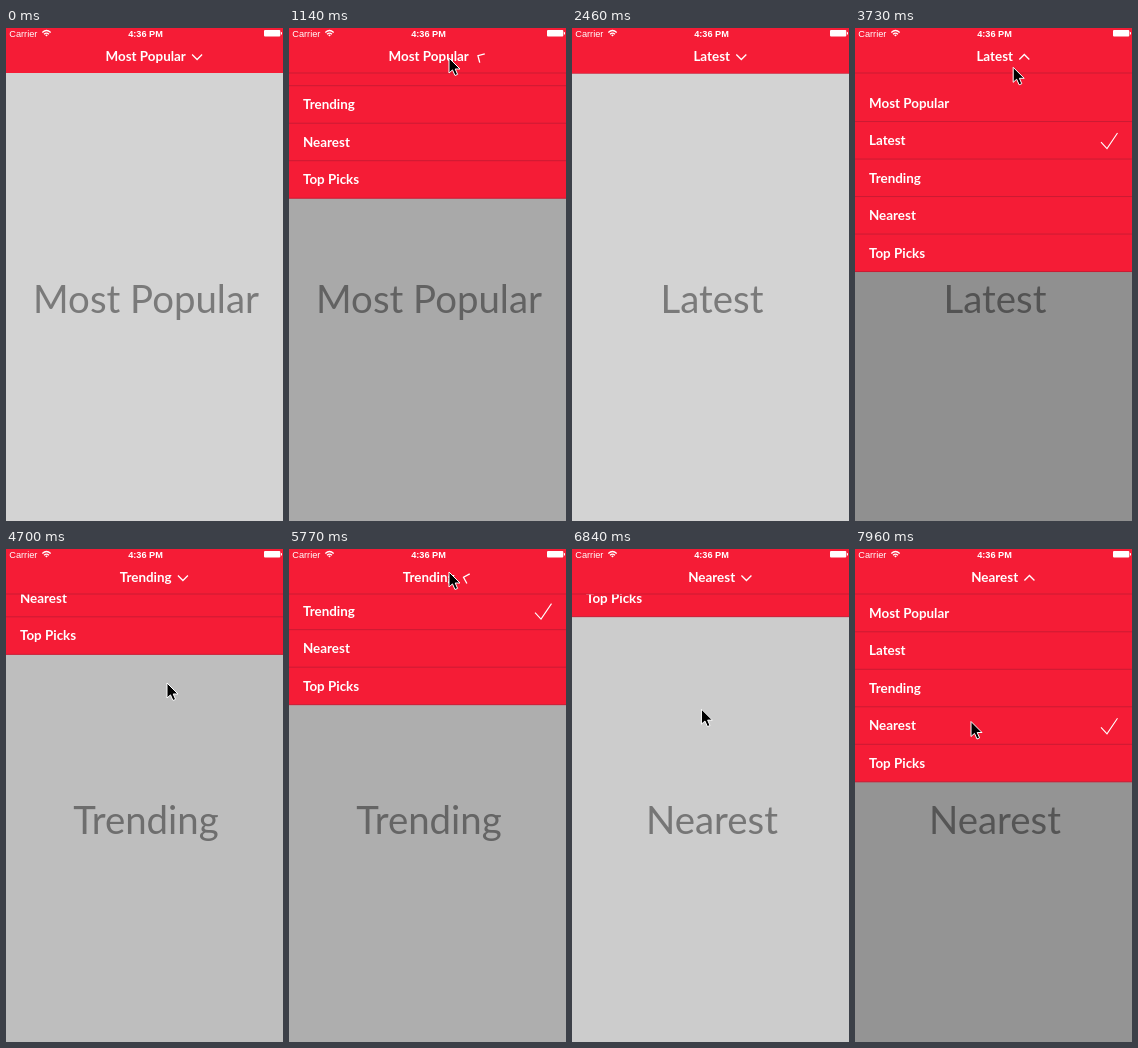
An HTML page that plays this animation: 277x493 px, repeating every 7990 ms.

```html
<!DOCTYPE html>
<html lang="en">
<head>
<meta charset="utf-8">
<title>Dropdown menu</title>
<style>
  html, body { margin: 0; width: 100%; height: 100%; overflow: hidden; background: #d3d3d3; }
  svg { display: block; width: 277px; height: 493px; }
  text { font: 700 13.4px Lato, sans-serif; fill: #fff; }
  .mid { text-anchor: middle; }
  .status { font: 9.2px "Liberation Sans", sans-serif; }
  #clock { font-weight: 700; }
  #page { font: 400 38.4px Lato, sans-serif; fill: #7a7a7a; }
  .bar { fill: #f51c36; }
  .rule { fill: #cb1a33; }
  .stroke { fill: none; stroke: #fff; }
</style>
</head>
<body>
<svg viewBox="0 0 277 493">
  <defs><clipPath id="below"><rect y="45" width="277" height="448"/></clipPath></defs>
  <rect width="277" height="493" fill="#d3d3d3"/>
  <text id="page" class="mid" x="140" y="285"></text>
  <rect id="shade" y="45" width="277" height="448"/>
  <g clip-path="url(#below)">
    <g id="menu">
      <rect class="bar" y="-200" width="277" height="387.5"/>
      <path id="check" class="stroke" stroke-width="1.1" d="M246 20.500L252 27L262.500 11.500"/>
    </g>
  </g>
  <rect class="bar" width="277" height="45"/>
  <rect id="edge" class="rule" y="44.500" width="277" height="1"/>
  <text class="status" x="3.300" y="8.500">Carrier</text>
  <g class="stroke" stroke-width="1.3">
    <path d="M36.300 4.400Q40.500 .6 44.700 4.400M38 6.200Q40.500 4 43 6.200"/>
    <path d="M39.100 7L40.500 8.600L41.900 7Q40.500 6 39.100 7Z" fill="#fff" stroke="none"/>
  </g>
  <text id="clock" class="status mid" x="139.500" y="8.500">4:36 PM</text>
  <rect x="258" y="2" width="16.300" height="6.600" rx="1" fill="#fff"/>
  <rect x="274.900" y="4" width="1.100" height="2.600" rx=".5" fill="#fff"/>
  <text id="title" class="mid" x="139.700" y="33.400"></text>
  <path id="arrow" class="stroke" stroke-width="1.3" d="M-5 -2.500L0 2.500L5 -2.500"/>
  <path id="cursor" d="M0 0V15L3.500 11.900L6 17.500L8.600 16.400L6.200 11H11Z" fill="#000" stroke="#fff" stroke-width="1" stroke-linejoin="round"/>
</svg>
<script>
const LOOP = 7990, ROW = 37.5, NAV = 45, OFFSTAGE = [279, 100];
const items = ['Most Popular', 'Latest', 'Trending', 'Nearest', 'Top Picks'];
const $ = id => document.getElementById(id);

// The menu opens with a click on the title and closes when an item is picked.
// `enter` marks visits where the pointer comes in from the side.
const visits = [
  { enter: 250, open: 1018, pick: 1970, title: [160, 30], rowX: 165 },
  { enter: 2960, open: 3475, pick: 4393, title: [158, 33], rowX: 161 },
  { open: 5661, pick: 6454, title: [160, 23], rowX: 128 },
  { open: 7470, pick: LOOP, title: [145, 25], rowX: 116 }
];

const clamp = p => Math.min(1, Math.max(0, p));
const ease = p => (1 - Math.cos(Math.PI * clamp(p))) / 2;

// Underdamped spring from 0 to 1 lasting 750 ms.
function spring(ms) {
  if (ms >= 750) return 1;
  const s = ms / 1000, decay = 9.2, freq = 10.76;
  return 1 - Math.exp(-decay * s) * (Math.cos(freq * s) + 0.81 * Math.sin(freq * s));
}

// Pointer legs: to the title before each opening, then down to the row.
const legs = [];
let place = OFFSTAGE, left = 0;
const travel = (from, until, goal) => {
  legs.push({ from, until, start: place, goal });
  place = goal;
};
visits.forEach((v, i) => {
  if (v.enter) travel(left, left + 400, OFFSTAGE);
  travel(v.enter || left + 60, v.open - 200, v.title);
  travel(v.open + 100, v.open + 490, [v.rowX, NAV + (Math.min(i + 1, 3) + 0.4) * ROW]);
  left = v.pick;
});

function pointer(t) {
  const leg = legs.filter(l => t >= l.from).pop();
  const p = ease(clamp((t - leg.from) / (leg.until - leg.from)) ** 2);
  return leg.start.map((a, i) => a + (leg.goal[i] - a) * p);
}

function addNode(tag, attrs, content = '') {
  const node = document.createElementNS('http://www.w3.org/2000/svg', tag);
  for (const key in attrs) node.setAttribute(key, attrs[key]);
  node.textContent = content;
  $('menu').append(node);
}

items.forEach((name, i) => {
  addNode('text', { x: 14, y: i * ROW + 23.5 }, name);
  addNode('rect', { class: 'rule', y: (i + 1) * ROW - 0.5, width: 277, height: 1 });
});

const move = (id, x, y, turn = 0) =>
  $(id).setAttribute('transform', `translate(${x} ${y}) rotate(${turn})`);

function draw() {
  const t = performance.now() % LOOP;
  const chosen = visits.filter(v => t >= v.pick).length;
  const visit = visits.filter(v => t >= v.open).pop();
  let shown = 0, turn = 0;
  if (visit) {
    const closing = t >= visit.pick;
    shown = closing ? 1 - ease((t - visit.pick) / 500) : spring(t - visit.open);
    turn = clamp(closing ? 1 - spring(t - visit.pick) : shown);
  }
  $('page').textContent = $('title').textContent = items[chosen];
  $('shade').setAttribute('opacity', 0.3 * shown);
  $('edge').setAttribute('opacity', shown > 0.01 ? 1 : 0);
  move('menu', 0, NAV - items.length * ROW * (1 - shown) - (shown ? 0 : 2));
  move('check', 0, chosen * ROW);
  move('arrow', 151 + $('title').getComputedTextLength() / 2, 29, 180 * turn);
  move('cursor', ...pointer(t));
  requestAnimationFrame(draw);
}
draw();
</script>
</body>
</html>
```
